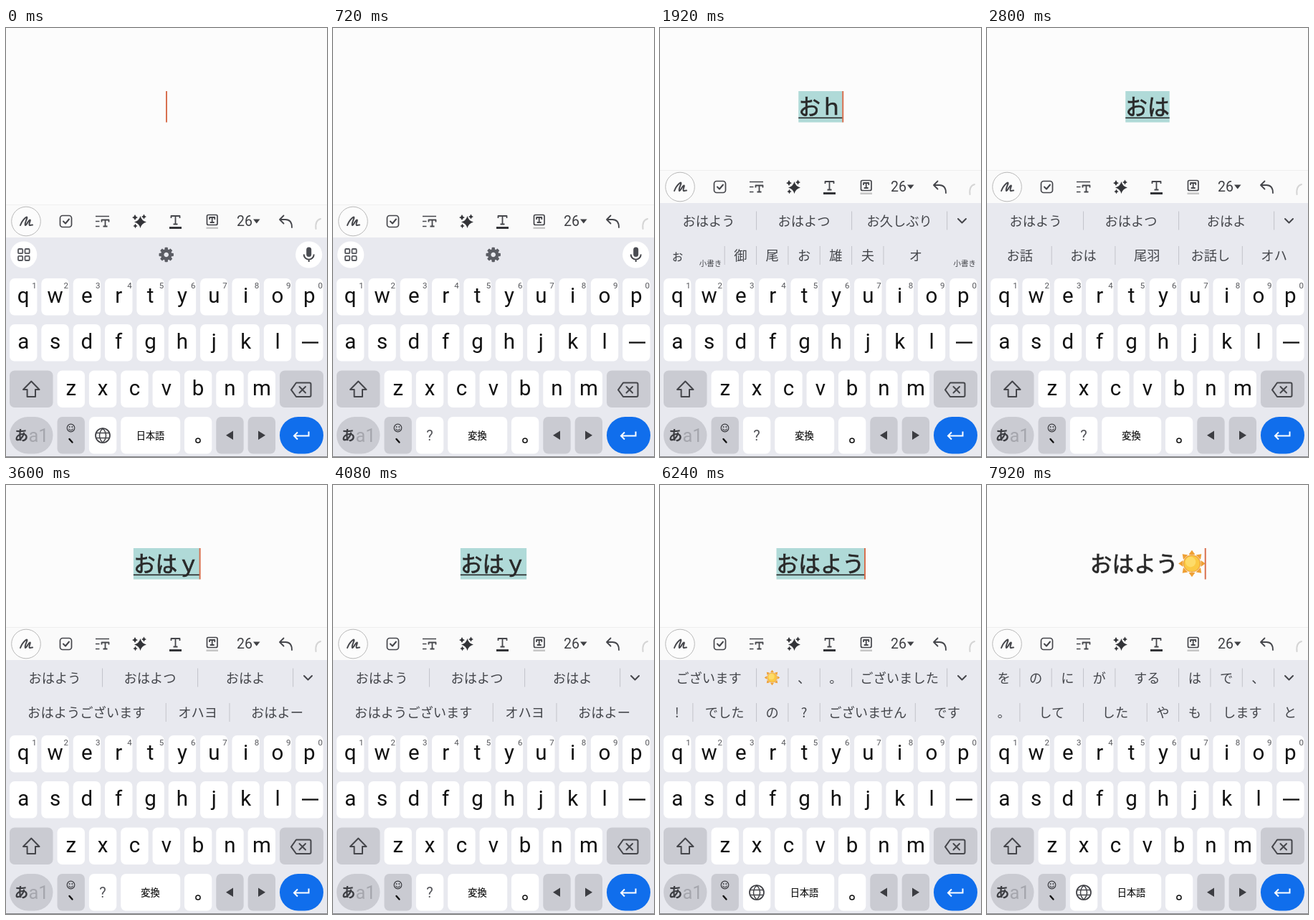
These frames come from a looping animation (448 px wide and 598 px high, 8000 ms). An HTML page:

```html
<!DOCTYPE html>
<html lang="ja">
<head>
<meta charset="utf-8">
<title>Romaji typing</title>
<style>
html, body { margin: 0; width: 100%; height: 100%; overflow: hidden; background: #fcfcfc; }
svg { display: block; width: 100%; height: 100%; }
text { font-family: "Noto Sans CJK JP", "Noto Sans CJK", sans-serif; }
.latin { font-family: Roboto, "Noto Sans", sans-serif; }
.mid { text-anchor: middle; }
.line { fill: none; stroke: #45464b; stroke-width: 2; stroke-linecap: round; stroke-linejoin: round; }
.cand { font-size: 18.3px; fill: #44464b; text-anchor: middle; }
.tiny { font-size: 10.5px; fill: #44464b; text-anchor: end; }
.note { font-size: 30.7px; fill: #292929; stroke: #292929; stroke-width: .7; }
</style>
</head>
<body>
<svg id="stage" viewBox="0 0 448 598" xmlns="http://www.w3.org/2000/svg"></svg>
<script>
const LOOP = 8000, UNIT = 44.35, CHAR = 30.75, SUN = 37.5;
const stage = document.getElementById('stage');

const rect = (x, y, w, h, fill, r = 0, extra = '') =>
  `<rect x="${x}" y="${y}" width="${w}" height="${h}" rx="${r}" fill="${fill}" ${extra}/>`;
const circle = (x, y, r, fill, extra = '') =>
  `<circle cx="${x}" cy="${y}" r="${r}" fill="${fill}" ${extra}/>`;
const line = (d, extra = '') => `<path class="line" d="${d}" ${extra}/>`;
const shape = (d, fill) => `<path d="${d}" fill="${fill}"/>`;
const text = (x, y, s, cls, extra = '') => `<text x="${x}" y="${y}" class="${cls}" ${extra}>${s}</text>`;
const group = (id, body) => `<g id="${id}">${body}</g>`;

function star(x, y, r) {
  const k = r * .2;
  return shape(`M${x} ${y - r}Q${x + k} ${y - k} ${x + r} ${y}Q${x + k} ${y + k} ${x} ${y + r}` +
    `Q${x - k} ${y + k} ${x - r} ${y}Q${x - k} ${y - k} ${x} ${y - r}Z`, '#333438');
}

function sun(x, y, r) {
  let rays = '';
  for (let i = 0; i < 8; i++) {
    rays += `<path d="M-.24 -.66L0 -1L.24 -.66Z" fill="#efa035" transform="rotate(${i * 45})"/>`;
  }
  return `<g transform="translate(${x} ${y}) scale(${r})">${rays}` +
    circle(0, 0, .61, '#fbc944', 'stroke="#efa238" stroke-width=".07"') +
    circle(-.1, -.12, .38, '#fddb69') + '</g>';
}

function toolbar() {
  const T = (x, y, w, h) => line(`M${x - w} ${y + 3}V${y}H${x + w}V${y + 3}M${x} ${y}V${y + h}M${x - 3} ${y + h}H${x + 3}`,
    'style="stroke-linecap:butt;stroke-width:1.8"');
  return rect(0, 246, 448, 46, '#fafafa') + rect(0, 246, 448, 1, '#efefef') +
    circle(28, 269.5, 20.3, '#fcfcfc', 'stroke="#b9b9b9"') +
    line('M20 275C22 269 27 264 29 263.5C31 264 25 273 27 275C29 275 31 268 33.5 267.5C35 268 31 273 33 275C34 275.5 35 274 37 274.5') +
    rect(75.5, 261.5, 16, 16, 'none', 3.5, 'stroke="#45464b" stroke-width="1.7"') +
    line('M80 269.5L83 272.5L88 266.5') +
    line('M125 262.5H144M125 269.5H130.5M125 276.5H130.5', 'stroke-width="1.8" style="stroke-width:1.7;stroke-linecap:butt"') +
    T(138.5, 267.5, 5, 9) +
    star(187.5, 270.5, 8.5) + star(180, 264, 4) + star(192.5, 263, 3.5) + star(180.5, 276, 3.2) +
    T(236.5, 262, 6, 11.5) + rect(228, 277, 17, 3, '#333438') +
    rect(280.5, 260.5, 14.5, 14, 'none', 2, 'stroke="#45464b" stroke-width="1.7"') +
    T(287.7, 264, 3.6, 7) + rect(279.5, 277.5, 16.5, 2.5, '#c6c6c6') +
    text(322, 276, '26', 'latin', 'font-size="19.5" fill="#3f4044"') +
    shape('M345 266.5H354.5L349.75 272.5Z', '#3f4044') +
    line('M387.5 261.5L382 267L387.5 272.5M382.5 267H390C396 267 399 271 399 278', 'style="stroke-width:1.8"') +
    line('M432.5 280C431.5 271 435 267 439 266', 'style="stroke:#d5d5d5"');
}

function toolRow() {
  let s = circle(24.7, 316, 18.6, '#fff') + circle(422.7, 316, 18.6, '#fff');
  for (const x of [17, 26.5]) for (const y of [308, 317.8]) {
    s += rect(x, y, 6.2, 6.2, 'none', 1.3, 'stroke="#55575d" stroke-width="1.8"');
  }
  let teeth = '';
  for (let i = 0; i < 8; i++) {
    teeth += rect(-2.2, -10.2, 4.4, 5, '#5b5d64', 1, `transform="rotate(${i * 45})"`);
  }
  s += `<g transform="translate(223.7 316)">${teeth}${circle(0, 0, 5.5, 'none', 'stroke="#5b5d64" stroke-width="4.4"')}</g>`;
  return s + rect(419.2, 305.5, 7, 13.5, '#4a4c52', 3.5) +
    line('M415.7 315.5C415.7 325 429.7 325 429.7 315.5M422.7 322.5V326', 'style="stroke-linecap:butt"');
}

function keys() {
  const dark = '#cacbd2', W = 38.4, H = 51.5;
  const col = i => 5 + i * UNIT;
  const key = (i, y, fill = '#fff', w = W, r = 7) => rect(col(i), y, w, H, fill, r);
  const letter = (c, i, y) => key(i, y) +
    text(col(i) + W / 2, y + 34, c, 'latin mid', 'font-size="29.5" fill="#111"');
  let s = '';
  [...'qwertyuiop'].forEach((c, i) => {
    s += letter(c, i, 349) +
      text(col(i) + 34.5, 362.5, (i + 1) % 10, 'latin mid', 'font-size="11.5" fill="#55565b"');
  });
  [...'asdfghjkl'].forEach((c, i) => s += letter(c, i, 413));
  s += key(9, 413) + line('M413 438.5H436', 'style="stroke:#111;stroke-width:2.3;stroke-linecap:butt"');
  [...'zxcvbnm'].forEach((c, i) => s += letter(c, i + 1.5, 477.5));
  s += key(0, 477.5, dark, 60.5) + key(8.5, 477.5, dark, 61) +
    line('M35.3 492.5L46.5 504H41V514H29.6V504H24Z') +
    line('M405 494.5H423.5Q425.5 494.5 425.5 496.5V512Q425.5 514 423.5 514H405L398 504.3Z') +
    line('M409.5 500L418 508.5M418 500L409.5 508.5');

  const y = 542;
  s += key(0, y, dark, 60.5, 25.7) +
    text(21.5, 575, 'あ', 'mid', 'font-size="19.5" font-weight="700" fill="#3c3d42"') +
    text(45.5, 577, 'a1', 'latin mid', 'font-size="25.5" fill="#a5a6ad"') +
    key(1.5, y, dark) +
    circle(90.5, 557.5, 5.3, 'none', 'stroke="#3c3d42" stroke-width="1.2"') +
    circle(88.6, 556, .9, '#3c3d42') + circle(92.4, 556, .9, '#3c3d42') +
    line('M87.7 559C89 561.3 92 561.3 93.3 559', 'style="stroke-width:1.1"') +
    line('M88.5 573L92.5 577.5', 'style="stroke:#111;stroke-width:2.4"') +
    key(2.5, y) + key(3.5, y, '#fff', 83) + key(5.5, y) +
    circle(268, 575, 3.1, 'none', 'stroke="#111" stroke-width="1.5"') +
    key(6.5, y, dark) + key(7.5, y, dark) +
    shape('M317 561.5V574L307 567.75Z', '#3c3d42') + shape('M352 561.5V574L362 567.75Z', '#3c3d42') +
    key(8.5, y, '#106eec', 61, 25.7) +
    line('M422.5 562.5V568.5H402.5M407 563.5L402 568.5L407 573.5', 'style="stroke:#fff;stroke-linecap:butt;stroke-linejoin:miter"');
  const globe = circle(135, 568, 10, 'none', 'stroke="#3c3d42" stroke-width="1.7"') +
    line('M135 558C129 564 129 572 135 578C141 572 141 564 135 558M126 564.5H144M126 571.5H144', 'style="stroke-width:1.5"');
  const label = s => text(201.5, 572.5, s, 'mid', 'font-size="13.2" fill="#111" stroke="#111" stroke-width=".2"');
  return s + group('idleKeys', globe + label('日本語')) +
    group('composeKeys', text(135, 574.5, '?', 'latin mid', 'font-size="20" fill="#55565b"') + label('変換'));
}

// Entries are "word:columns"; a trailing * adds the small-kana tag.
function candidateRow(spec, y) {
  let at = 0, s = '';
  const cells = spec.split(' ');
  cells.forEach((cell, i) => {
    let [word, span] = cell.split(':');
    const tagged = word.endsWith('*');
    const left = 1.5 + at * UNIT, w = span * UNIT;
    const x = left + w / 2 - (tagged ? 21.5 : 0);
    if (tagged) {
      word = word.slice(0, -1);
      s += text(left + w - 4, y + 15, '小書き', 'tiny');
    }
    s += word === '☀' ? sun(156.5, y, 10.8) : text(x, y + 7, word, 'cand');
    at += +span;
    if (at < 10) s += rect(1 + at * UNIT, y - 13, 1, 26, '#c3c4ca');
  });
  return s;
}

const FIRST = 'おはよう:3 おはよつ:3 ';
const KANA_ROW = 'ぉ*:2 御:1 尾:1 お:1 雄:1 夫:1 オ*:3';
const CANDIDATES = {
  o: ['おはよう:3 お疲れ:3 お久しぶり:3', KANA_ROW],
  oh: [FIRST + 'お久しぶり:3', KANA_ROW],
  oha: [FIRST + 'おはよ:3', 'お話:2 おは:2 尾羽:2 お話し:2 オハ:2'],
  ohay: [FIRST + 'おはよ:3', 'おはようございます:5 オハヨ:2 おはよー:3'],
  greeting: ['ございます:3 ☀:1 、:1 。:1 ございました:3', '!:1 でした:2 の:1 ?:1 ございません:3 です:2'],
  after: ['を:1 の:1 に:1 が:1 する:2 は:1 で:1 、:1', '。:1 して:2 した:2 や:1 も:1 します:2 と:1']
};

// Each step overrides only what changes at that time.
const STEPS = [
  [0, { note: '', marked: false, composing: false, list: '' }],
  [640, { composing: true }],
  [800, { note: 'お', marked: true }],
  [880, { list: 'o' }],
  [1840, { note: 'おｈ', list: 'oh' }],
  [2640, { note: 'おは', list: 'oha' }],
  [3520, { note: 'おはｙ', list: 'ohay' }],
  [4560, { note: 'おはよ' }],
  [6160, { note: 'おはよう', composing: false, list: 'greeting' }],
  [6320, { marked: false }],
  [7760, { note: 'おはよう☀' }],
  [7840, { list: 'after' }]
];
// The caret flips at each of these times, starting visible.
const BLINKS = [0, 240, 1840, 2320, 2880, 3360, 3520, 4000, 4480, 4960, 5480, 6000, 6160, 6640, 7120, 7680, 7760];

function noteLine({ note, marked }, caret) {
  const sunny = note.endsWith('☀');
  const words = sunny ? note.slice(0, -1) : note;
  const wordsW = words.length * CHAR;
  const w = wordsW + (sunny ? SUN : 0);
  const x = 224 - w / 2;
  return (marked ? rect(x, 88, w, 43.5, '#b0dad8') : '') +
    text(x, 120.5, words, 'note') +
    (marked ? rect(x, 124.5, w, 1.6, '#292929') : '') +
    (sunny ? sun(x + wordsW + SUN / 2 + .5, 109.5, 18.8) : '') +
    (caret ? rect(x + w - (note ? .5 : 1), 88, 2, 43.5, '#d8704f') : '');
}

stage.innerHTML = rect(0, 0, 448, 598, '#fcfcfc') + group('noteLine', '') +
  group('toolbar', toolbar()) +
  rect(0, 292, 448, 306, '#e8e9ef') + rect(0, 244, 448, 60, '#e8e9ef', 0, 'id="panel"') +
  group('toolRow', toolRow()) + group('candidates', '') + keys() +
  rect(0, 597, 448, 1, '#85868b');

const part = id => document.getElementById(id);
const show = (id, on) => part(id).setAttribute('visibility', on ? 'visible' : 'hidden');
let drawn = '';

function render(t) {
  const state = Object.assign({}, ...STEPS.filter(s => s[0] <= t).map(s => s[1]));
  const caret = BLINKS.filter(b => b <= t).length % 2 === 1;
  const id = JSON.stringify([state, caret]);
  if (id === drawn) return;
  drawn = id;
  const open = state.list !== '';
  part('noteLine').innerHTML = noteLine(state, caret);
  part('toolbar').setAttribute('transform', `translate(0 ${open ? -48 : 0})`);
  show('panel', open);
  show('toolRow', !open);
  show('idleKeys', !state.composing);
  show('composeKeys', state.composing);
  const rows = CANDIDATES[state.list];
  part('candidates').innerHTML = open
    ? candidateRow(rows[0], 268.5) + candidateRow(rows[1], 317) + line('M416 266L421.5 271.5L427 266')
    : '';
}

const start = performance.now();
function tick() {
  render((performance.now() - start) % LOOP);
  requestAnimationFrame(tick);
}
tick();
</script>
</body>
</html>
```
